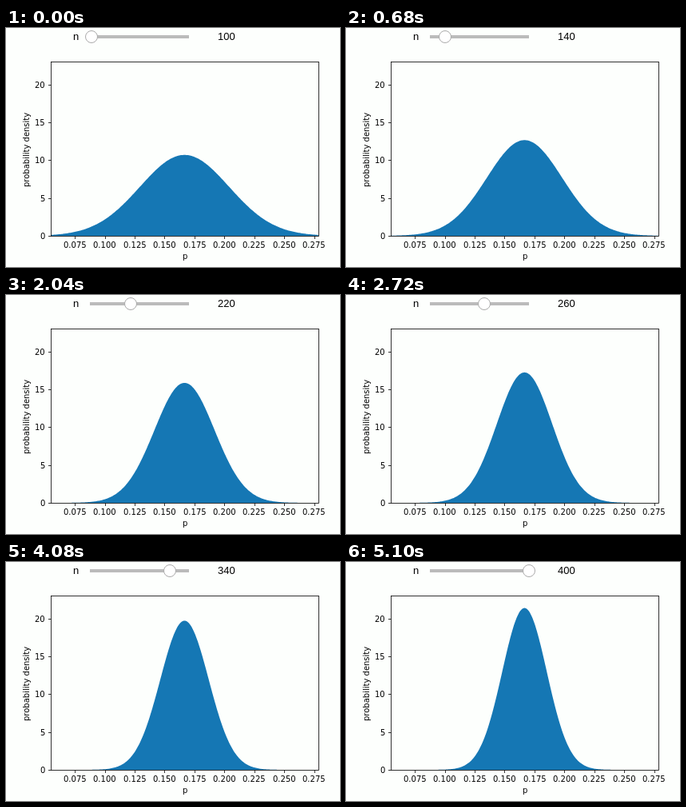
An HTML page with a canvas for the animation above (5440 ms loop, 418 by 299 pixels).

```html
<!DOCTYPE html>
<html lang="en">
<head>
<meta charset="utf-8">
<style>
  html, body { margin: 0; width: 100%; height: 100%; overflow: hidden; background: #fdfffd; }
  canvas { display: block; }
</style>
</head>
<body>
<canvas width="418" height="299"></canvas>
<script>
const ctx = document.querySelector('canvas').getContext('2d');
const STEP_MS = 340, STEPS = 16;
const LEFT = 56, BOTTOM = 260, WIDTH = 334.8, HEIGHT = 217.44;
const P = 1 / 6, Y_MAX = 23;
const sigma = n => Math.sqrt(P * (1 - P) / n);
const X_MIN = P - 3 * sigma(100), X_SPAN = 6 * sigma(100);
const toX = p => LEFT + (p - X_MIN) / X_SPAN * WIDTH;
const toY = d => BOTTOM - d / Y_MAX * HEIGHT;
const snap = v => Math.round(v) + 0.5;

const PLOT_FONT = '10px "DejaVu Sans", sans-serif';
const UI_FONT = '13px "Liberation Sans", Arial, sans-serif';

// Text starts on a whole pixel; anchor is 0 (left), 0.5 (centre) or 1 (right).
function text(str, x, y, anchor = 0.5, font = PLOT_FONT) {
  ctx.font = font;
  ctx.fillStyle = '#000';
  ctx.fillText(str, Math.round(x - anchor * ctx.measureText(str).width), y);
}

function line(x1, y1, x2, y2) {
  ctx.beginPath();
  ctx.moveTo(x1, y1);
  ctx.lineTo(x2, y2);
  ctx.stroke();
}

function drawSlider(n, fraction) {
  text('n', 84, 15, 0, UI_FONT);
  text(n, 265, 15, 0, UI_FONT);
  ctx.fillStyle = '#bbb';
  ctx.fillRect(105, 9, 124, 4);
  ctx.beginPath();
  ctx.arc(Math.ceil(107 + 122 * fraction), 11, 7.5, 0, 2 * Math.PI);
  ctx.fillStyle = '#fff';
  ctx.fill();
  ctx.lineWidth = 1;
  ctx.strokeStyle = '#aaa';
  ctx.stroke();
}

function drawDensity(n) {
  const s = sigma(n), peak = 1 / (s * Math.sqrt(2 * Math.PI));
  ctx.beginPath();
  ctx.moveTo(LEFT, BOTTOM);
  for (let i = 0; i <= 300; i++) {
    const p = X_MIN + X_SPAN * i / 300, z = (p - P) / s;
    ctx.lineTo(toX(p), toY(peak * Math.exp(-z * z / 2)));
  }
  ctx.lineTo(LEFT + WIDTH, BOTTOM);
  ctx.fillStyle = '#1577b4';
  ctx.fill();
}

function drawAxes() {
  const left = snap(LEFT), bottom = snap(BOTTOM);
  ctx.lineWidth = 0.8;
  ctx.strokeStyle = '#000';
  ctx.strokeRect(left, 42.5, 335, 218);
  for (let i = 3; i <= 11; i++) {
    const x = toX(i * 0.025);
    line(snap(x), bottom, snap(x), bottom + 3.5);
    text((i * 0.025).toFixed(3), x, 275);
  }
  for (let d = 0; d <= 20; d += 5) {
    const y = snap(toY(d));
    line(left - 3.5, y, left, y);
    text(d, 49, y + 3.5, 1);
  }
  text('p', 224, 289);
  ctx.save();
  ctx.translate(29, 152);
  ctx.rotate(-Math.PI / 2);
  text('probability density', 0, 0);
  ctx.restore();
}

function draw() {
  const step = Math.floor(performance.now() / STEP_MS) % STEPS;
  const n = 100 + 20 * step;
  ctx.fillStyle = '#fdfffd';
  ctx.fillRect(0, 0, 418, 299);
  drawSlider(n, step / (STEPS - 1));
  drawDensity(n);
  drawAxes();
  requestAnimationFrame(draw);
}
draw();
</script>
</body>
</html>
```
